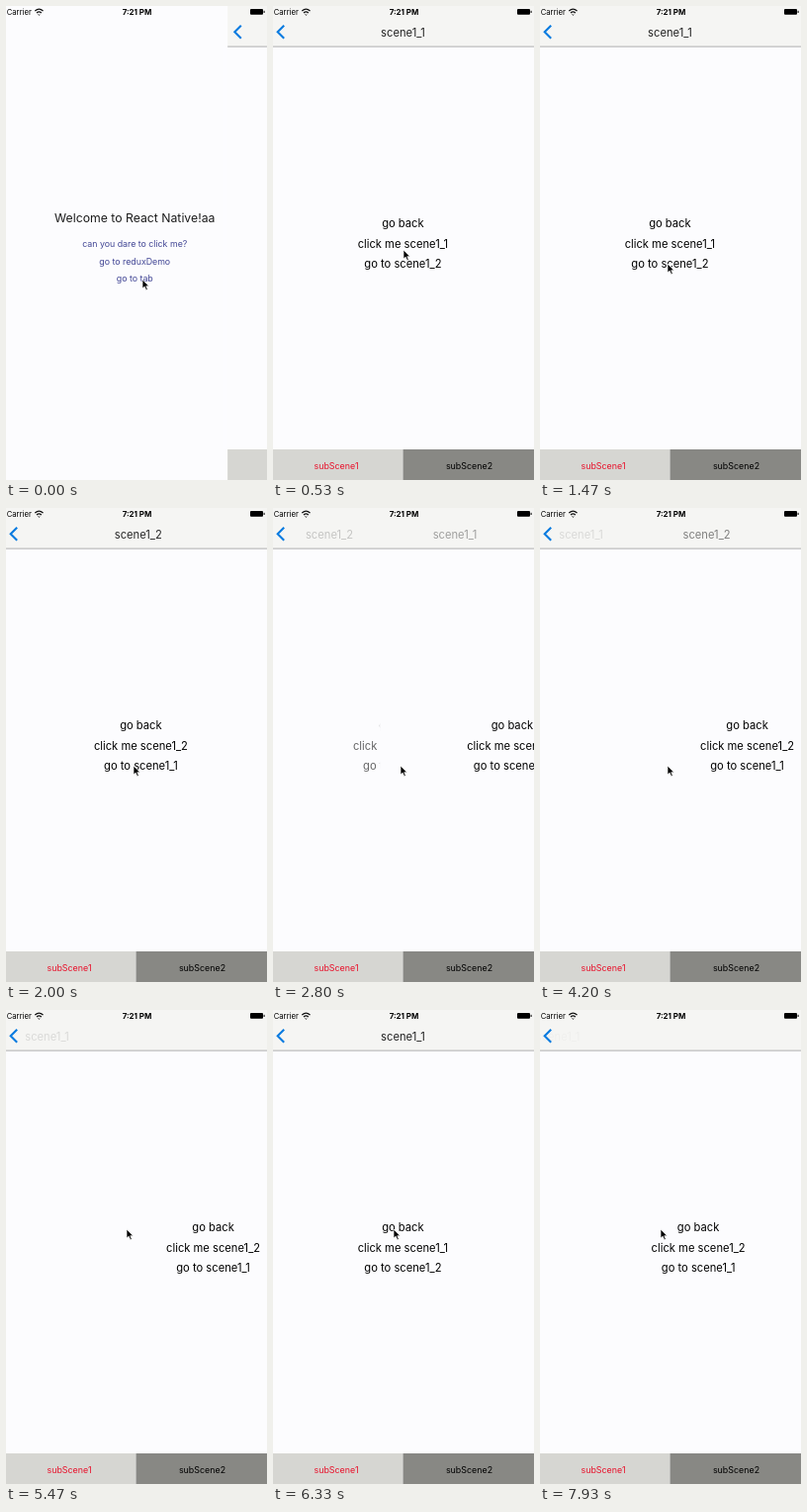
An HTML page that plays this animation: 264x480 px, repeating every 8 s.

```html
<!DOCTYPE html>
<html lang="en">
<head>
<meta charset="utf-8">
<title>Scene navigation</title>
<style>
  html, body { margin: 0; width: 100%; height: 100%; overflow: hidden; background: #fcfcfe; }
  svg { display: block; width: 100vw; height: 100vh; }
  text { font-family: Inter, Roboto, sans-serif; text-anchor: middle; fill: #000; }
  .body { font-size: 11.2px; }
  .title { font-size: 11.2px; fill: #222; }
  .link { font-size: 8.8px; fill: #2b3088; }
  .tab { font-size: 8.9px; }
  .small { font-size: 7.7px; text-anchor: start; }
</style>
</head>
<body>
<svg viewBox="0 0 264 480" xmlns="http://www.w3.org/2000/svg">
  <rect width="264" height="480" fill="#fcfcfe"/>
  <g id="home">
    <text x="131" y="219" font-size="12.25">Welcome to React Native!aa</text>
    <text class="link" x="131" y="244">can you dare to click me?</text>
    <text class="link" x="131" y="261.5">go to reduxDemo</text>
    <text class="link" x="131" y="279">go to tab</text>
  </g>

  <g id="tabs">
    <rect x="-2.5" width="268" height="480" fill="#fcfcfe"/>
    <g id="back"></g>
    <g id="front"></g>
    <rect x="-2.5" width="268" height="41" fill="#f5f5f3"/>
    <rect x="-2.5" y="40.6" width="268" height="1" fill="#b0b0b0"/>
    <text id="backTitle" class="title" y="30.5"></text>
    <text id="frontTitle" class="title" y="30.5"></text>
    <path d="M11.2 19.8L4.7 26.3L11.2 32.8" fill="none" stroke="#0a7be0" stroke-width="2.1"/>
    <rect x="-2.5" y="449" width="134" height="31" fill="#d6d6d2"/>
    <rect x="131.5" y="449" width="134" height="31" fill="#888884"/>
    <text class="tab" x="64" y="469" style="fill:#e8102a">subScene1</text>
    <text class="tab" x="198.5" y="469">subScene2</text>
  </g>

  <g id="status">
    <text class="small" x="0.7" y="9">Carrier</text>
    <g fill="none" stroke="#111" stroke-width="1.3">
      <path d="M29.3 4.9Q33.4 1.5 37.5 4.9M31 6.9Q33.4 5 35.8 6.9"/>
      <path d="M32.5 8.4L33.4 9.2L34.3 8.4" stroke-width="1"/>
    </g>
    <text x="132.5" y="9" font-size="7.9" font-weight="700">7:21 PM</text>
    <rect x="247" y="3" width="13" height="5.8" rx="1" fill="#000"/>
    <rect x="260.6" y="4.8" width="1" height="2.2" fill="#000"/>
  </g>

  <path id="cursor" d="M0 0V9L2.2 7.2L3.8 10.8L5.3 10.1L3.8 6.7H6.6Z"
        fill="#000" stroke="#fff" stroke-width=".7"/>
</svg>
<script>
const $ = id => document.getElementById(id);
const LOOP = 8000, SLIDE = 400, WIDTH = 267, MID = 131.4;
const TITLE_SHIFT = 127, CARD_SHIFT = 5;

// start time, scene below, scene on top, kind
const moves = [
  [-98, 0, 1, 'open'],
  [1630, 1, 2, 'push'],
  [2580, 2, 1, 'push'],
  [3947, 1, 2, 'push'],
  [5325, 1, 2, 'pop'],
  [6580, 2, 1, 'pop'],
  [7850, 1, 2, 'pop']
];

// time, x, y of the pointer tip
const pointer = [
  [0, 138, 277], [120, 138, 277], [530, 132, 247], [800, 131, 247],
  [1350, 129, 261], [4500, 129, 261], [5050, 122, 222], [LOOP, 122, 222]
];

const clamp = v => Math.min(1, Math.max(0, v));
const ease = t => t < .5 ? .5 * (2 * t) ** 1.7 : 1 - .5 * (2 - 2 * t) ** 1.7;
const fade = v => v ** 1.7;
const name = n => n ? 'scene1_' + n : '';
const shift = (el, x, y = 0) => el.setAttribute('transform', `translate(${x} ${y})`);

function fillCard(el, n) {
  if (el.scene === n) return;
  el.scene = n;
  const lines = n ? ['go back', 'click me ' + name(n), 'go to ' + name(3 - n)] : [];
  el.innerHTML = '<rect x="-2.5" y="41" width="268" height="408" fill="#fcfcfe"/>' +
    lines.map((s, i) => `<text class="body" x="${MID}" y="${224 + i * 20.6}">${s}</text>`).join('');
}

function setTitle(el, n, x, opacity) {
  el.textContent = name(n);
  el.setAttribute('x', MID + x);
  el.setAttribute('opacity', opacity);
}

function movePointer(t) {
  const i = Math.max(1, pointer.findIndex(k => k[0] >= t));
  const [t0, x0, y0] = pointer[i - 1], [t1, x1, y1] = pointer[i];
  const k = ease(clamp((t - t0) / (t1 - t0)));
  shift($('cursor'), x0 + (x1 - x0) * k, y0 + (y1 - y0) * k);
}

function render(t) {
  const [start, below, top, kind] = moves.filter(m => m[0] <= t).pop();
  const p = ease(clamp((t - start) / SLIDE));
  const opening = kind === 'open';

  $('home').setAttribute('opacity', opening ? 1 - .7 * p : 0);
  shift($('home'), -CARD_SHIFT * p);
  shift($('tabs'), opening ? (1 - p) * WIDTH : 0);

  // q: how far the top card covers the one below
  const q = opening ? 1 : kind === 'push' ? p : 1 - p;
  fillCard($('back'), below);
  fillCard($('front'), top);
  shift($('back'), -CARD_SHIFT * q);
  $('back').setAttribute('opacity', 1 - .7 * q);
  shift($('front'), (1 - q) * WIDTH);
  setTitle($('backTitle'), below, -TITLE_SHIFT * q, fade(1 - q));
  setTitle($('frontTitle'), top, TITLE_SHIFT * (1 - q), kind === 'pop' ? 0 : fade(q));

  movePointer(t);
}

const begin = performance.now();
function tick() {
  render((performance.now() - begin) % LOOP);
  requestAnimationFrame(tick);
}
tick();
</script>
</body>
</html>
```
